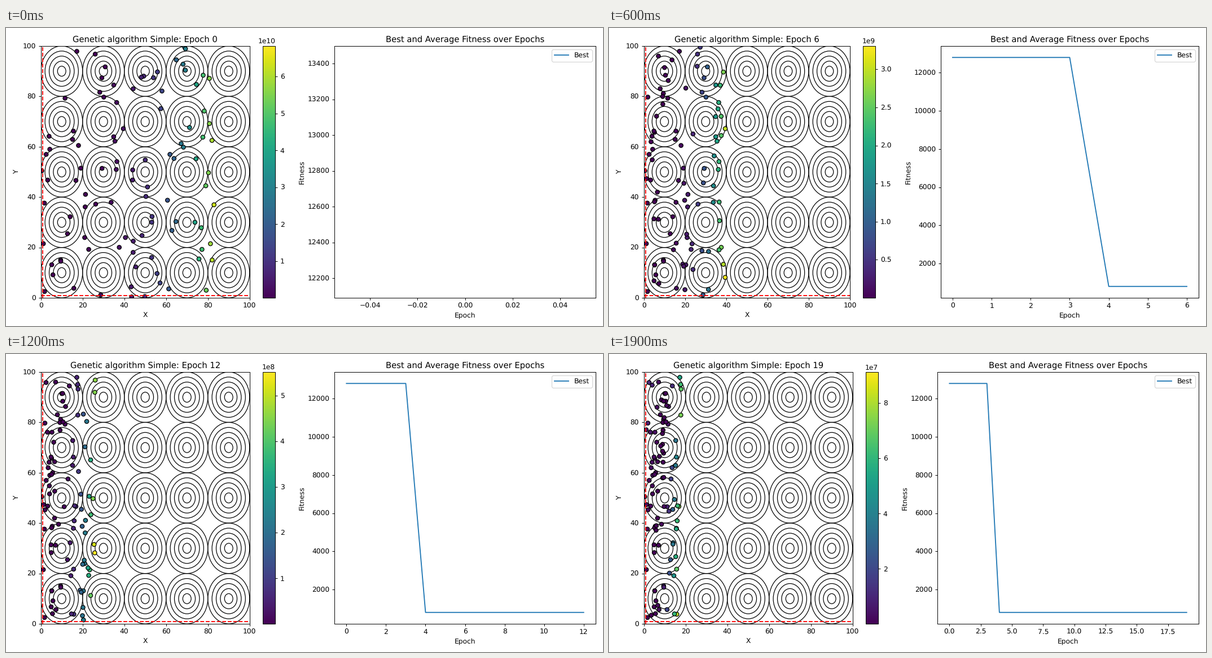
Animation, 1058 px wide and 529 px high, one loop 2 s. Source, as a matplotlib script:

```python
import numpy as np
import matplotlib.pyplot as plt
from matplotlib.animation import FuncAnimation
from matplotlib.patches import Circle

plt.rcParams["text.hinting"] = "none"

EPOCHS = 20
SIZE = 100            # individuals alive in each epoch
SCALE = 1346          # fitness = SCALE * error^2
DPI = 1058 / 12

# Selection pressure: largest surviving error at a few key epochs.
KEY_EPOCHS = [0, 3, 6, 10, 14, 17, 19]
KEY_LIMITS = [7123, 2934, 1567, 779.5, 525.6, 380.5, 260.3]


def limit(epoch):
    return np.exp(np.interp(epoch, KEY_EPOCHS, np.log(KEY_LIMITS)))


def best(epoch):
    return 12794 if epoch < 4 else 805


def error(points):
    x, y = points.T
    return np.abs(y - x ** 2)


def evolve(seed):
    """Each epoch drops the unfit and refills with fit random newcomers."""
    rng = np.random.default_rng(seed)
    alive = np.empty((0, 2))
    generations = []
    for epoch in range(EPOCHS):
        alive = alive[error(alive) <= limit(epoch)]
        count = SIZE - len(alive)
        y = rng.uniform(0, 100, count)
        x = rng.uniform(0, 1, count) * np.sqrt(limit(epoch) + y)
        alive = np.vstack([alive, np.column_stack([x, y])])
        generations.append(alive)
    return generations


GENERATIONS = evolve(seed=7)


def draw_population(ax, epoch):
    for cx in range(10, 100, 20):
        for cy in range(10, 100, 20):
            for r in range(2, 11, 2):
                ax.add_patch(Circle((cx, cy), r, fill=False, lw=1))
    points = GENERATIONS[epoch]
    dots = ax.scatter(*points.T, c=SCALE * error(points) ** 2,
                      vmin=best(epoch), vmax=SCALE * limit(epoch) ** 2,
                      cmap="viridis", edgecolors="black")
    ax.axvline(1, color="red", linestyle="--")
    ax.axhline(1, color="red", linestyle="--")
    ax.set(xlim=(0, 100), ylim=(0, 100), xlabel="X", ylabel="Y",
           title=f"Genetic algorithm Simple: Epoch {epoch}")
    fig.colorbar(dots, ax=ax)


def draw_fitness(ax, epoch):
    epochs = range(epoch + 1)
    ax.plot(epochs, [best(e) for e in epochs], label="Best")
    ax.set(xlabel="Epoch", ylabel="Fitness",
           title="Best and Average Fitness over Epochs")
    ax.legend(loc="upper right")


def update(epoch):
    fig.clear()
    # Start from the default margins so the layout depends on this epoch only.
    fig.subplots_adjust(left=0.125, right=0.9, bottom=0.11, top=0.88,
                        wspace=0.2)
    left, right = fig.subplots(1, 2)
    draw_population(left, epoch)
    draw_fitness(right, epoch)
    fig.tight_layout()
    return []


fig = plt.figure(figsize=(12, 6), dpi=DPI)
anim = FuncAnimation(fig, update, frames=EPOCHS, init_func=lambda: [],
                     interval=100, repeat=True, repeat_delay=0)
plt.show()
```
